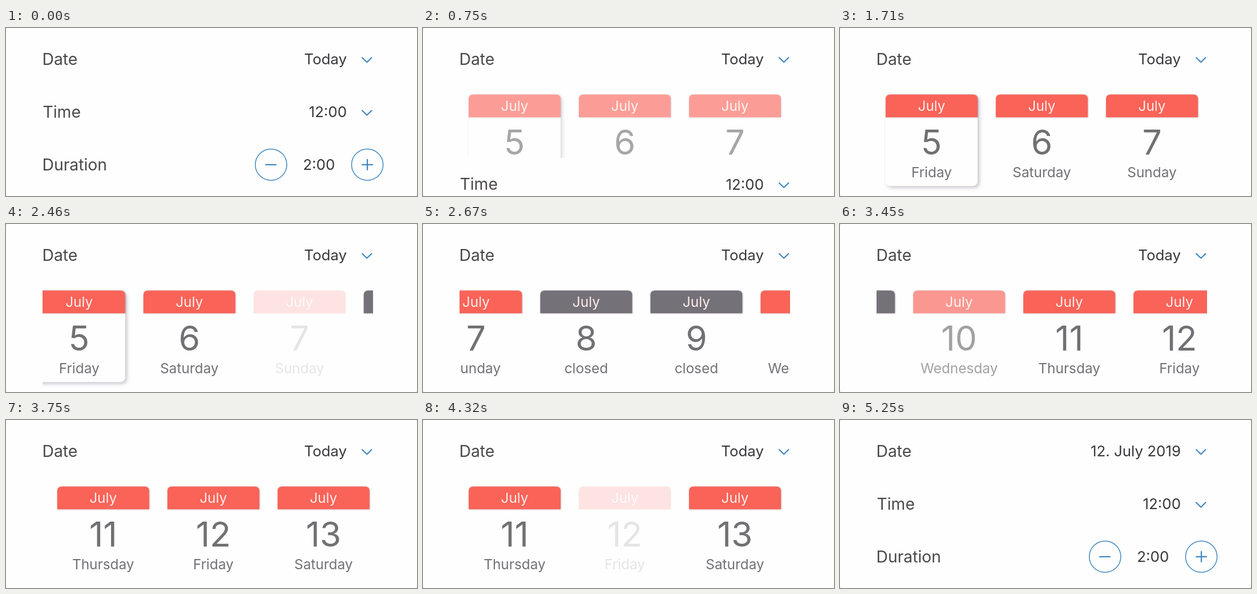
Recreate the animation shown at these times as an HTML page. Size 720 by 296 pixels, loop 5.31 s.

```html
<!DOCTYPE html>
<html lang="en">
<head>
<meta charset="utf-8">
<title>Date picker</title>
<style>
  html, body { margin: 0; width: 100%; height: 100%; overflow: hidden; background: #d4d4d4; }
  svg { display: block; width: 720px; height: 296px; font-family: Inter, Roboto, sans-serif; }
  .label { font-size: 28.3px; fill: #4b484b; }
  .value { font-size: 25.9px; font-weight: 370; fill: #3a383b; }
  .end { text-anchor: end; }
  .mid { text-anchor: middle; }
  .line { fill: none; stroke: #4389c1; stroke-width: 2.3; stroke-linecap: round; stroke-linejoin: round; }
  .ring { stroke-width: 1.5; }
  .card text { text-anchor: middle; font-size: 24.4px; fill: #737075; }
  .card .month { fill: #fdeceb; }
  .card .number { font-size: 60.5px; font-weight: 400; fill: #727074; }
</style>
</head>
<body>
<svg viewBox="0 0 720 296">
  <defs>
    <clipPath id="panelClip"><rect id="panelRect" x="64" y="101" width="579" height="0"/></clipPath>
    <filter id="lift" x="-20%" y="-20%" width="140%" height="140%">
      <feDropShadow dx="3" dy="3" stdDeviation="3" flood-color="#5a4864" flood-opacity=".34"/>
    </filter>
    <filter id="edge" x="-5%" y="-10%" width="110%" height="120%">
      <feDropShadow dx=".6" dy=".3" stdDeviation=".8" flood-color="#503c40" flood-opacity=".45"/>
    </filter>
  </defs>
  <rect width="720" height="296" rx="2.5" fill="#fefefe"/>

  <g id="panel" clip-path="url(#panelClip)"><g id="strip"></g></g>

  <text class="label" x="63.5" y="64.7">Date</text>
  <text class="value end" id="date" x="597" y="64">Today</text>
  <path class="line" d="M624 52.3l8.2 8 8.2-8"/>

  <g id="rows">
    <text class="label" x="64.5" y="158">Time</text>
    <text class="value end" x="597" y="157.3">12:00</text>
    <path class="line" d="M624 145.5l8.2 8 8.2-8"/>
    <text class="label" x="63.5" y="251.3">Duration</text>
    <circle class="line ring" cx="464.3" cy="240.8" r="27.6"/>
    <path class="line" d="M455 240.8h18"/>
    <text class="value mid" x="548.3" y="250.3">2:00</text>
    <circle class="line ring" cx="633" cy="240.8" r="27.6"/>
    <path class="line" d="M624 240.8h18M633 231.8v18"/>
  </g>
</svg>
<script>
  const LOOP = 5310;
  const PITCH = 193;
  const PAGE = 3 * PITCH;
  const PANEL_HEIGHT = 203;
  const FIRST_DAY = 5;
  const PRESSED = 0.17;
  const DAYS = ["Friday", "Saturday", "Sunday", "closed", "closed",
                "Wednesday", "Thursday", "Friday", "Saturday"];
  const OPEN = { start: 540, length: 360 };
  const CLOSE = { start: 4490, length: 390 };
  const SWIPES = [2406.5, 3258];

  // Touch feedback per day: dim between down and held, restore between up and done.
  const PRESSES = {
    7: [2250, 2390, 2500, 2650],
    10: [3200, 3265, 3363, 3513],
    12: [4230, 4312, 4390, 4490]
  };

  const byId = id => document.getElementById(id);
  const [panel, panelRect, strip, rows, dateText] =
    ["panel", "panelRect", "strip", "rows", "date"].map(byId);

  const clamp = x => Math.min(1, Math.max(0, x));
  const ramp = (t, from, to) => clamp((t - from) / (to - from));
  const easeInOut = x => x * x * (3 - 2 * x);

  // Gentle start, fast middle, long deceleration.
  function swipe(elapsed) {
    if (elapsed <= 0) return 0;
    const x = elapsed * 0.0157;
    return x > 13 ? 1 : 1 - (1 + x + x * x / 2) * Math.exp(-x);
  }

  function cardMarkup(name, i) {
    const header = name === "closed" ? "#757178" : "#f96459";
    const body = i === 0
      ? '<rect y="117.3" width="161" height="161" rx="8" fill="#fefefe" filter="url(#lift)"/>' : "";
    return `<g class="card" transform="translate(${80 + i * PITCH} 0)">${body}
      <path d="M0 157.3v-32q0-8 8-8h145q8 0 8 8v32z" fill="${header}" filter="url(#edge)"/>
      <text class="month" x="80.5" y="146.3">July</text>
      <text class="number" x="80.5" y="223.3">${FIRST_DAY + i}</text>
      <text x="80.5" y="262.6">${name}</text></g>`;
  }

  strip.innerHTML = DAYS.map(cardMarkup).join("");
  const cards = [...strip.children];

  function pressAlpha(t, [down, held, up, done]) {
    return 1 - (1 - PRESSED) * (ramp(t, down, held) - ramp(t, up, done));
  }

  function phase(t, { start, length }) {
    return easeInOut(ramp(t, start, start + length));
  }

  function render(t) {
    const openness = phase(t, OPEN) - phase(t, CLOSE);
    const scroll = PAGE * SWIPES.reduce((sum, start) => sum + swipe(t - start), 0);

    rows.setAttribute("transform", `translate(0 ${openness * PANEL_HEIGHT})`);
    rows.setAttribute("visibility", openness === 1 ? "hidden" : "visible");
    panel.setAttribute("opacity", openness);
    panelRect.setAttribute("height", openness * PANEL_HEIGHT);
    strip.setAttribute("transform", `translate(${-scroll} 0)`);

    for (const [day, times] of Object.entries(PRESSES)) {
      cards[day - FIRST_DAY].setAttribute("opacity", pressAlpha(t, times));
    }
    dateText.textContent = t < CLOSE.start ? "Today" : "12. July 2019";
  }

  const begin = performance.now();
  function tick() {
    render((performance.now() - begin) % LOOP);
    requestAnimationFrame(tick);
  }
  tick();
</script>
</body>
</html>
```
